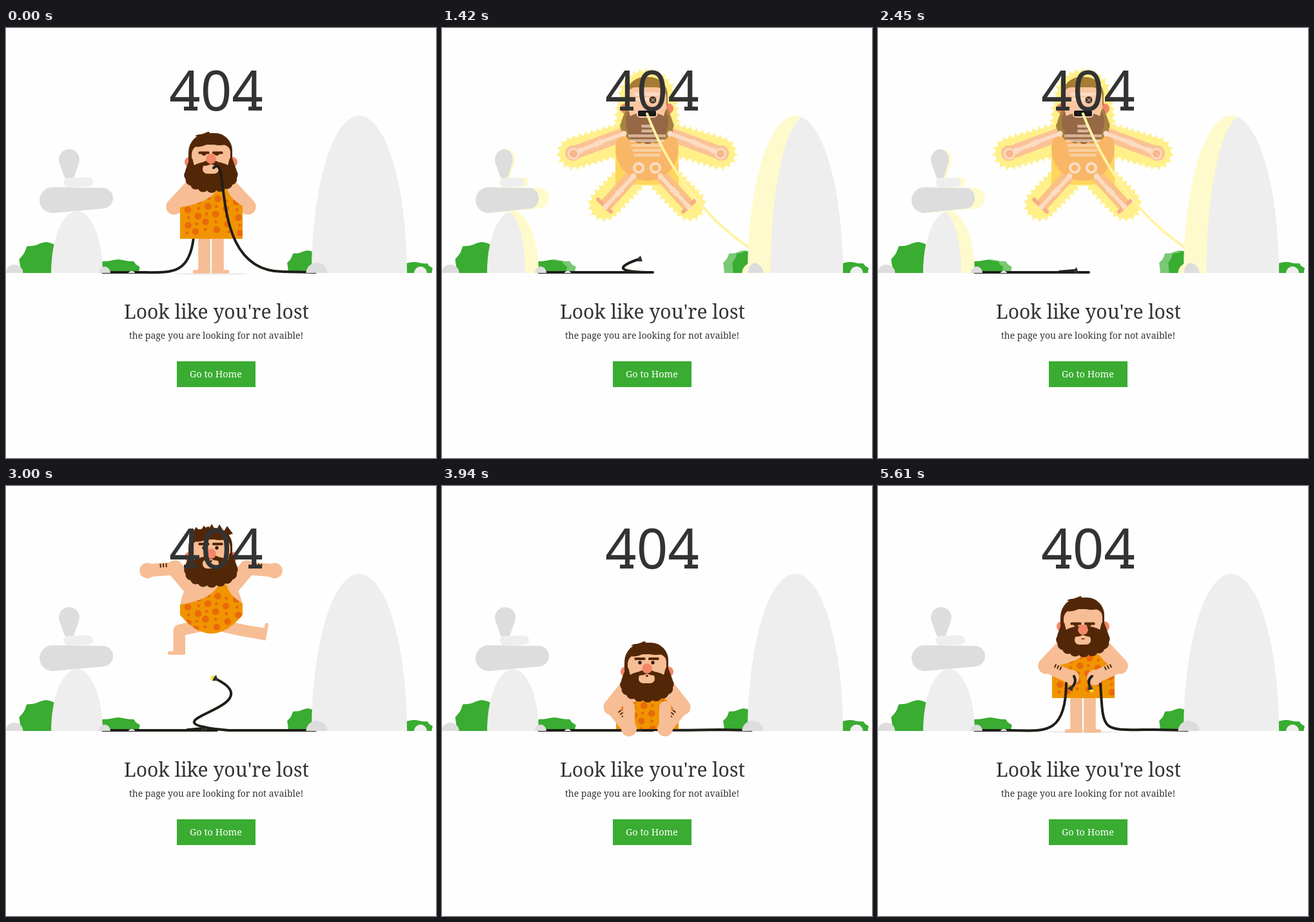
Recreate the animation shown at these times as an HTML page with a canvas. Size 667 by 667 pixels, loop 5.72 s.

```html
<!DOCTYPE html>
<html lang="en">
<head>
<meta charset="utf-8">
<title>404</title>
<style>
  html, body { margin: 0; width: 100%; height: 100%; overflow: hidden; background: #fefefe; }
  canvas, svg { position: absolute; left: 0; top: 0; width: 667px; height: 667px; }
  text { font-family: "Noto Serif", serif; font-weight: 500; fill: #333; text-anchor: middle; }
  .code { font: 500 85px "Noto Sans", "Open Sans", sans-serif; }
</style>
</head>
<body>
<canvas width="667" height="667"></canvas>
<svg viewBox="0 0 667 667">
  <text class="code" x="326" y="127.5">404</text>
  <path d="M276 122h21v6h-21zM376 122h21v6h-21z" fill="#333"/>
  <text x="326.5" y="451" font-size="30">Look like you're lost</text>
  <text x="326" y="482" font-size="14">the page you are looking for not avaible!</text>
  <rect x="265" y="517" width="122" height="40" fill="#39ac31"/>
  <text x="325.5" y="542" font-size="14.5" style="fill:#fff">Go to Home</text>
</svg>
<script>
const ctx = document.querySelector('canvas').getContext('2d');
const { PI, sin, cos, abs, hypot, atan2, round, floor, min, max } = Math;
const LOOP = 5720, SHOCK = 1010, FREE = 2730, DROP = 3040, LAND = 3290, RISE = 4710, UP = 5050;
const SKIN = '#f7bd94', HAIR = '#522707', PINK = '#f48668', ORANGE = '#f09400', SPOT = '#e96a0a';
const GREEN = '#39ac31', GRAY = '#ddd', PALE = '#eee', DARK = '#1f1e19', BONE = '#fbdcc4', AURA = '#fff08a';
const MID = 318, GROUND = 380;

// drawing helpers
function fill(d, color) {
  ctx.fillStyle = color;
  ctx.fill(d instanceof Path2D ? d : new Path2D(d));
}
function stroke(d, width, color, cap = 'round') {
  ctx.lineWidth = width;
  ctx.strokeStyle = color;
  ctx.lineCap = cap;
  ctx.lineJoin = 'round';
  ctx.stroke(new Path2D(d));
}
function oval(x, y, rx, ry, color) {
  const p = new Path2D();
  p.ellipse(x, y, rx, ry, 0, 0, 2 * PI);
  fill(p, color);
}
const disc = (x, y, r, color) => oval(x, y, r, r, color);
function box(x, y, w, h, r, color) {
  const p = new Path2D();
  p.roundRect(x, y, w, h, r);
  fill(p, color);
}
function placed(draw, x, y, angle = 0, scale = 1) {
  ctx.save();
  ctx.translate(x, y);
  ctx.rotate(angle);
  ctx.scale(scale, 1);
  draw();
  ctx.restore();
}
const bothSides = draw => [-1, 1].forEach(side => placed(() => draw(side), MID, 0, 0, side));
function clipped(path, draw) {
  ctx.save();
  ctx.clip(path);
  draw();
  ctx.restore();
}

// value of a keyframed list or record at time t
function at(keys, t) {
  const i = keys.findIndex(k => k[0] > t);
  if (i < 0) return keys[keys.length - 1][1];
  const [t0, a] = keys[i - 1], [t1, b] = keys[i];
  const u = (t - t0) / (t1 - t0), e = u * u * (3 - 2 * u);
  const out = Array.isArray(a) ? [] : {};
  for (const k in a) out[k] = a[k] + (b[k] - a[k]) * e;
  return out;
}

// scenery
function dome(x, rx, h) {
  const p = new Path2D();
  p.ellipse(x, GROUND, rx, h, 0, PI, 2 * PI);
  return p;
}
function bush(x, rx, h) {
  const p = new Path2D(), flatten = v => Math.sign(v) * abs(v) ** .7;
  for (let a = PI; a >= 0; a -= PI / 60) {
    const r = 1 - .08 * abs(cos(a * 5));
    p.lineTo(x + rx * r * flatten(cos(a)), GROUND - h * r * flatten(sin(a)));
  }
  p.lineTo(x + rx, GROUND);
  return p;
}
// hull of two discs
function pebble(x1, y1, r1, x2, y2, r2) {
  const p = new Path2D(), dir = atan2(y2 - y1, x2 - x1);
  const a = Math.acos((r1 - r2) / hypot(x2 - x1, y2 - y1));
  p.arc(x1, y1, r1, dir + a, dir - a + 2 * PI);
  p.arc(x2, y2, r2, dir - a, dir + a);
  p.closePath();
  return p;
}
const item = (path, color, edge = 0, scale = 1) => ({ path, color, edge, scale });
const bushes = [
  item(bush(62, 43, 48), GREEN),
  item(bush(174, 35, 21), GREEN, 140, .8),
  item(bush(468, 33, 35), GREEN, 500, .78),
  item(bush(633, 30, 17), GREEN)
];
const stones = [
  item(pebble(98, 204, 16, 98, 227, 8.5), GRAY, 82, .87),
  item(pebble(97, 240, 7.5, 128, 239, 7), PALE, 90, .84),
  item(pebble(72, 267, 20, 150, 264, 16), GRAY, 52, .86),
  item(dome(110, 40, 96), PALE, 70, .74),
  item(dome(548, 74, 244), PALE, 622, .76),
  item(dome(482, 16.5, 16), GRAY, 498, .72),
  item(dome(13, 13.5, 13), GRAY),
  item(dome(153, 9, 10), GRAY),
  item(dome(195, 5, 3), PALE),
  item(dome(643, 10, 10), PALE)
];
// in the flash, colour shrinks towards the edge away from the light
function scenery(items, glow, shock) {
  for (const { path, color, edge, scale } of items) {
    fill(path, shock && scale < 1 ? glow : color);
    if (shock) clipped(path, () => {
      ctx.translate(edge * (1 - scale), 0);
      ctx.scale(scale, 1);
      fill(path, color);
    });
  }
}

// cables: loose end, two handles, joint; then straight to the anchor
const bitten = [322, 217, 350, 190, 312, 378, 430, 378];
const live = [318, 133, 340, 190, 390, 285, 480, 343];
const loose = [325, 299, 420, 345, 195, 365, 345, 379];
const flat = [326, 378, 350, 379, 380, 379, 430, 378];
const held = [345, 307, 350, 385, 345, 378, 430, 378];
const rightCable = [[0, bitten], [SHOCK, bitten], [1130, live], [FREE, live], [3000, loose], [DROP, loose],
  [LAND, flat], [RISE, flat], [UP, held]];
const behind = [291, 325, 284, 385, 255, 379, 205, 379];
const curled = [307, 358, 265, 372, 275, 379, 327, 379];
const lying = [307, 376, 265, 379, 275, 379, 327, 379];
const lifted = [292, 306, 291, 390, 255, 379, 205, 379];
const leftCable = [[0, behind], [SHOCK, behind], [1300, curled], [1900, curled], [2350, lying],
  [RISE, lying], [UP, lifted]];

function cable([x, y, ...rest], anchor, color = DARK) {
  stroke(`M${x} ${y}C${rest.join(' ')}L${anchor} 379`, 4, color);
}
const plug = (x, y, turn) => placed(() => fill('M-5 4L-2 -2L1 -5L4 4Z', '#33312c'), x, y, turn);
const spark = (x, y) => fill(`M${x} ${y - 5}l1 3 4-1-3 3 3 4-4-1-2 3-1-4-4 0 3-3-2-3 4 1z`, '#ffe02e');

// caveman: limbs are angles, arms from outward, legs from straight down
const stand = { head: 0, body: 0, face: 0, curve: 0, hip: 10.5, upper: .82, fore: PI, thigh: 0, shin: 0, kick: 0, foot: 1 };
const air = { ...stand, head: -98, body: -94, curve: 33, hip: 18, upper: -.87, fore: .08, thigh: 1.35, kick: 1.4 };
const sit = { ...stand, head: 80, body: 64, hip: 28, upper: .9, fore: 2.25, thigh: PI, foot: 0 };
const hold = { ...stand, head: 10, body: 2, face: 10, fore: 2.71 };
const poses = [[0, stand], [FREE - 1, stand], [FREE, air], [DROP, air], [LAND, sit], [RISE, sit], [UP, hold]];

function arm(p, marks) {
  const x = 32, y = 250 + p.body, ex = x + 37 * cos(p.upper), ey = y + 37 * sin(p.upper);
  stroke(`M${x} ${y}L${ex} ${ey}`, 25, SKIN);
  placed(() => {
    stroke('M0 0H43', 20, SKIN);
    disc(43, 0, 12, SKIN);
    const up = cos(p.fore) > 0 ? -1 : 1;
    if (marks) for (const k of [13, 17.5, 22]) stroke(`M${k} ${3 * up}V${9 * up}`, 2, HAIR, 'butt');
  }, ex, ey, p.fore);
}
function leg(p, side, cap) {
  const shin = p.shin + (side > 0 ? p.kick : 0), y = 311 + p.body;
  const kx = p.hip + 32 * sin(p.thigh), ky = y + 32 * cos(p.thigh);
  const fx = kx + 35 * sin(shin), fy = ky + 35 * cos(shin);
  stroke(`M${p.hip} ${y}L${kx} ${ky}L${fx} ${fy}`, 18.5, SKIN, cap);
  placed(() => stroke(`M${-7 * p.foot} 0H${15 * p.foot}`, 5.5, SKIN), fx, fy, -shin);
}
function robe({ body, curve }) {
  const hem = min(327 + body, 377);
  const path = new Path2D(`M270 ${hem - curve}V${278 + body}Q318 ${271 + body} 330 ${247 + body}H342` +
    `Q346 ${264 + body} 367 ${276 + body}V${hem - curve}Q318.5 ${hem + curve * .75} 270 ${hem - curve}Z`);
  fill(path, ORANGE);
  clipped(path, () => {
    for (let row = 0; row < 5; row++) for (let col = 0; col < 6; col++) {
      const big = (row + col) % 2, x = 280 + col * 16 + 3 * sin(row * 7 + col);
      disc(x, 267 + row * 12 + body + 3 * cos(col * 5), big ? 5.3 : 2.4, SPOT);
    }
  });
}
function beard(color) {
  oval(MID, 228, 38, 21, color);
  bothSides(() => fill(pebble(31, 204, 2.5, 32, 223, 8), color));
  for (let a = -.1; a < 3.3; a += .41) disc(MID + 33 * cos(a), 229 + 18 * sin(a), 8.8, color);
}
function head(t, face) {
  const biting = t < SHOCK, flying = t > FREE && t < LAND, alert = t > FREE && t < RISE + 150;
  const wink = biting ? min(1, max(0, (t - 500) / 150)) : 0;
  bothSides(() => disc(33, 208, 8, PINK));
  box(283, 163, 68, 45, [30, 27, 4, 4], HAIR);
  fill('M293 168Q298 163 306 166Q309 161 316 161L313 168Z', HAIR);
  if (flying) for (let x = 292; x < 345; x += 12) fill(`M${x - 8} 178L${x + 3} ${156 + abs(x - 320) / 5}L${x + 12} 172Z`, HAIR);
  box(288, 181, 60, 45, [15, 12, 0, 0], SKIN);
  fill('M292 184Q304 186 316 178Q326 184 340 181V176H292Z', HAIR);
  beard(HAIR);
  placed(() => {
    box(305, 211, 25, 15, 7, SKIN);
    fill('M303 213Q305 204 318 206Q330 204 332 213Q325 215 318 211Q311 215 303 213Z', HAIR);
    disc(MID, 203, 7.8, PINK);
    const brow = alert ? 186 : 191.5, eye = alert ? 194 : 196;
    box(298.5, brow, 17, 4, 1.5, HAIR);
    box(320, brow - 5 * wink, 16.5, 4, 1.5, HAIR);
    const blink = t > 3980 && t < 4450 && (t - 3980) % 350 < 100;
    [307, 327].forEach((x, right) => {
      if ((alert && !blink) || (right && wink > .5)) disc(x, eye, 2.7, '#2b1a10');
      else fill(`M${x - 4} ${eye - 1}h8q-1 3-4 3t-4-3z`, HAIR);
    });
    if (alert) disc(MID, 214.5, 1.8, HAIR);
    else if (!biting) stroke('M316 217H320', 1.5, HAIR);
  }, 0, face);
}
function caveman(t) {
  const p = { ...at(poses, t) };
  if (t >= FREE && t < DROP) p.upper += .08 * sin((t - 3000) / 45);
  const front = t > 3165, crouch = t > 3200 && t < 4860;
  const legs = () => bothSides(side => leg(p, side, crouch ? 'round' : 'butt'));
  const arms = () => bothSides(() => arm(p, t >= FREE));
  if (!crouch) legs();
  placed(() => fill('M290 233Q270 262 270 285H367Q367 262 346 233Z', SKIN), 0, p.body);
  if (!front) arms();
  robe(p);
  if (front) arms();
  if (crouch) legs();
  const chew = t > 240 && t < 800 ? .7 * sin((t - 240) / 30) : 0;
  placed(() => head(t, p.face), t > 600 && t < SHOCK ? .8 : 0, p.head + chew);
}

// capsule with a scalloped, spiky rim
function spiky(x1, y1, x2, y2, r) {
  const len = hypot(x2 - x1, y2 - y1), arc = PI * r, rim = 2 * (len + arc), count = round(rim / 9.5);
  const point = (i, off) => {
    const s = i / count * rim, far = s < len + arc, R = r + off;
    if (s < len) return `${s} ${-R} `;
    if (!far && s < 2 * len + arc) return `${2 * len + arc - s} ${R} `;
    const a = far ? (s - len) / r - PI / 2 : (s - 2 * len - arc) / r + PI / 2;
    return `${(far ? len : 0) + R * cos(a)} ${R * sin(a)} `;
  };
  let d = 'M' + point(0, 6);
  for (let i = 0; i < count; i++) d += `Q${point(i + .5, -6)}${point(i + 1, 6)}`;
  placed(() => fill(d, AURA), x1, y1, atan2(y2 - y1, x2 - x1));
}
function bone(x1, y1, x2, y2) {
  stroke(`M${x1} ${y1}L${x2} ${y2}`, 6, BONE);
  disc(x1, y1, 4.5, BONE);
  disc(x2, y2, 4.5, BONE);
}
function shocked(t) {
  spiky(MID, 108, MID, 120, 41);
  spiky(MID, 135, MID, 192, 46);
  bothSides(() => {
    spiky(24, 168, 114, 194, 22);
    spiky(16, 222, 66, 274, 22);
  });
  box(269, 165, 98, 78, 0, '#fed65c');
  bothSides(() => {
    stroke('M28 162L114 194', 21, '#fbc295');
    disc(115, 194, 12, '#fbc295');
    stroke('M16 222L64 275', 20, '#fbc088', 'butt');
    stroke('M56 285L76 266', 6, '#f7ad85');
    disc(33, 125, 8, PINK);
  });
  oval(MID, 188, 48.5, 49, '#f8b666');
  box(286, 76, 64, 45, [28, 28, 4, 4], '#a67c33');
  box(288, 92, 60, 45, [12, 16, 0, 0], '#fcc6a0');
  placed(() => beard('#a6823f'), 0, -76);
  clipped(pebble(MID, 145, 33, MID, 160, 28), () => placed(() => beard('#966845'), 0, -76));
  box(298, 100, 40, 5, 2.5, BONE);
  box(301, 108, 34, 5, 2.5, BONE);
  bothSides(() => {
    bone(36, 164, 72, 177);
    bone(78, 180, 103, 190);
    disc(114, 195, 9, BONE);
    disc(114, 195, 6, '#f8b78c');
    bone(21, 230, 40, 251);
    bone(45, 256, 64, 277);
    stroke('M13 210a7 7 0 1 1 -.1 0', 4, BONE);
  });
  ctx.globalAlpha = .65;
  for (let k = 0; k < 7; k++) {
    const w = k < 2 ? 9 : 33 - 2 * k;
    box(MID - w, 150 + 7.5 * k, 2 * w, 4.5, 2.2, BONE);
  }
  ctx.globalAlpha = 1;
  disc(327, 111.5, 5.5, '#47372c');
  stroke('M325 109.5L329.5 114M329.5 109.5L325 114', 1.3, '#b99a82');
  box(302, 126, 32, 13, 5, '#fbd0b0');
  box(304, 128, 28, 9, 2, floor(t / 118) % 2 ? '#fff' : '#1c1a18');
}

function draw(t) {
  const shock = t >= SHOCK && t < FREE, grounded = t >= DROP && t < RISE;
  const left = at(leftCable, t), right = at(rightCable, t);
  ctx.clearRect(0, 0, 667, 667);
  scenery(bushes, '#79c874', shock);
  if (t < SHOCK || t > RISE) oval(MID, 381.5, 58, 2, PALE);
  if (t < RISE) cable(left, 150);
  if (t >= SHOCK && t < RISE) plug(left[0], left[1]);
  if (grounded) cable(right, 480);
  if (shock) placed(() => shocked(t), 0, 83 * max(0, 1 - (t - SHOCK) / 120));
  else caveman(t);
  if (t >= RISE) cable(left, 150);
  if (!grounded) cable(right, 480, shock ? '#fff3a3' : DARK);
  if (t >= FREE && t < LAND) {
    spark(right[0] - 3, right[1] - 1);
    plug(right[0], right[1] - 1);
  }
  if (t >= UP) {
    stroke('M304 295Q309 304 301 312M332 295Q324 301 329 312', 4, DARK);
    if (t >= 5310) floor((t - 5310) / 37) % 2 ? spark(301, 318) : spark(331, 316);
    plug(300, 313, .5);
    plug(329, 312, -.3);
  }
  scenery(stones, '#fffacb', shock);
}

const start = performance.now();
function tick() {
  draw((performance.now() - start) % LOOP);
  requestAnimationFrame(tick);
}
tick();
</script>
</body>
</html>
```
